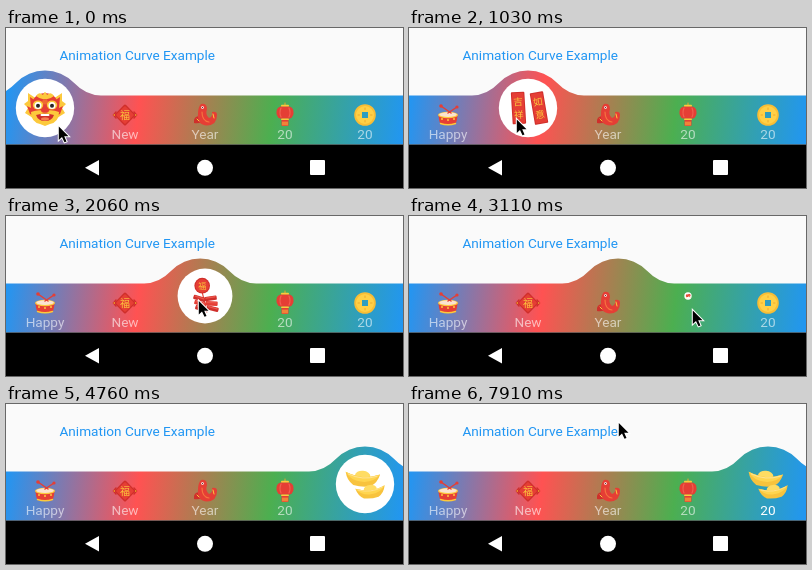
These frames come from a looping animation (397x160 px, 8000 ms). An HTML page with a canvas:

```html
<!DOCTYPE html>
<html lang="en">
<head>
<meta charset="utf-8">
<title>Animation Curve Example</title>
<style>
  html, body { margin: 0; height: 100%; overflow: hidden; background: #fafafa; }
  canvas { display: block; width: 397px; height: 160px; }
</style>
</head>
<body>
<canvas id="stage"></canvas>
<script>
const W = 397, H = 160, LOOP = 8000;
const BAR_TOP = 67.5, BAR_BOTTOM = 116.5;
const RED = '#e53e35', DARK_RED = '#cf2f2b', GOLD = '#fcc93c', AMBER = '#eda52c', CREAM = '#ffe7a8';
const canvas = document.getElementById('stage');
const ctx = canvas.getContext('2d');
const dpr = window.devicePixelRatio || 1;
canvas.width = W * dpr;
canvas.height = H * dpr;

// Drawing helpers
function shape(color, d, rule = 'nonzero') {
  ctx.fillStyle = color;
  ctx.fill(new Path2D(d), rule);
}
function line(color, width, d) {
  ctx.strokeStyle = color;
  ctx.lineWidth = width;
  ctx.lineCap = 'round';
  ctx.stroke(new Path2D(d));
}
function oval(color, x, y, rx, ry = rx, angle = 0) {
  ctx.fillStyle = color;
  ctx.beginPath();
  ctx.ellipse(x, y, rx, ry, angle, 0, Math.PI * 2);
  ctx.fill();
}
function box(color, x, y, w, h, radius = 1) {
  ctx.fillStyle = color;
  ctx.beginPath();
  ctx.roundRect(x - w / 2, y - h / 2, w, h, radius);
  ctx.fill();
}
function at(x, y, angle, scale, draw) {
  ctx.save();
  ctx.translate(x, y);
  ctx.rotate(angle);
  ctx.scale(scale, scale);
  draw();
  ctx.restore();
}
function text(string, x, y, color, align = 'center') {
  ctx.font = '13.6px Roboto, sans-serif';
  ctx.fillStyle = color;
  ctx.textAlign = align;
  ctx.textBaseline = 'alphabetic';
  ctx.fillText(string, x, y);
}
function glyph(char, x, y, size) {
  ctx.font = `${size}px "Noto Sans CJK SC", "Noto Sans CJK", sans-serif`;
  ctx.fillStyle = GOLD;
  ctx.textAlign = 'center';
  ctx.textBaseline = 'middle';
  ctx.fillText(char, x, y);
}

// Small icons, about 22px
function drum() {
  shape(RED, 'M-9.5 0 Q-9 9 -6 9.5 H6 Q9 9 9.5 0Z');
  line(GOLD, 1.5, 'M-7.5 8.5 Q0 11 7.5 8.5');
  oval(GOLD, 0, 0, 10, 3.2);
  oval('#fbe3d0', 0, -.4, 8.8, 2.4);
  for (const x of [-6, 0, 6]) oval(GOLD, x, 5 - Math.abs(x) / 6, 1);
  line(RED, 1.5, 'M-7 -9 L3 -2 M9 -8 L0 -2');
  oval(RED, -7, -9, 1.8);
  oval(RED, 9, -8, 1.6);
}
function diamond() {
  for (const side of [-1, 1]) {
    line(DARK_RED, 1.5, `M${side * 9} -3 L${side * 11.5} 0 L${side * 9} 3`);
    oval(AMBER, side * 10.5, 0, 1);
  }
  at(0, 0, Math.PI / 4, 1, () => {
    box(DARK_RED, 0, 0, 15.5, 15.5, 1.5);
    box(RED, 0, 0, 13, 13);
  });
  glyph('福', 0, 0, 10);
}
function fish() {
  shape(DARK_RED, 'M-5 1 Q-12 1 -11 8 Q-7 9 -3 7Z');
  shape(RED, 'M-4 -11 Q2 -12 2 -6 Q0 0 4 3 Q8 2 7 -3 Q12 -4 12 0 Q12 10 2 10.5 Q-8 10 -7 -1 Q-7 -8 -4 -11Z');
  line('#f5733f', 1.2, 'M-3 -3 Q-3 6 4 7');
  line(GOLD, 1, 'M8 -1 L9 3 M-8 4 L-6 6');
  oval('#fff', -2.5, -7.5, 1.3);
  oval('#40201c', -2.5, -7.5, .6);
}
function lantern() {
  line(AMBER, 1, 'M0 -12 V-9');
  box(RED, 0, 7.5, 7, 7, 1);
  line(GOLD, 1, 'M-2 7 V10 M0 7 V10 M2 7 V10');
  box(RED, 0, -2.5, 17, 12.5, 5.5);
  line('#f0604f', 1.2, 'M-4 -7 Q-6 -2.5 -4 2 M4 -7 Q6 -2.5 4 2');
  box(GOLD, 0, -9.3, 8, 1.8);
  box(GOLD, 0, 4.3, 8, 1.5);
}
function coin() {
  const disc = r => `M${-r} 0 A${r} ${r} 0 1 1 ${r} 0 A${r} ${r} 0 1 1 ${-r} 0Z`;
  shape('#f8bd35', disc(10.8) + 'M-3 -3 H3 V3 H-3Z', 'evenodd');
  shape('#ffd046', disc(9) + 'M-3 -3 H3 V3 H-3Z', 'evenodd');
  line(AMBER, .9, 'M0 -7 V-5.5 M0 7 V5.5 M-7 0 H-5.5 M7 0 H5.5');
}

// Large icons, about 40px
function lion() {
  for (const side of [-1, 1]) {
    ctx.save();
    ctx.scale(side, 1);
    shape(GOLD, 'M8 -9 L17 -15 L17 -7 L21 -4 L17 0 L20 5 L12 10Z');
    shape(RED, 'M9 -7 L15 -11 L14 0 L18 -2 L15 6 L8 9Z');
    ctx.restore();
  }
  shape(RED, 'M-14 2 Q-14 -14 0 -15 Q14 -14 14 2 L10 11 H-10Z');
  shape(GOLD, 'M-9 -12 Q-6 -17 -2 -13 Q0 -19 2 -13 Q6 -17 9 -12 Q4 -8 0 -9 Q-4 -8 -9 -12Z');
  oval('#ef6a32', 0, -6, 3, 2.5);
  for (const x of [-7, 7]) {
    oval(GOLD, x, -3, 5.2, 4.6);
    oval('#fff', x, -2.5, 3.5);
    oval('#2b2624', x, -2.3, 2);
  }
  shape(GOLD, 'M-14 4 Q-7 1 0 3 Q7 1 14 4 Q14 14 5 16 L0 18 L-5 16 Q-14 14 -14 4Z');
  shape(DARK_RED, 'M-9 7 Q0 4 9 7 Q7 13 0 13 Q-7 13 -9 7Z');
  box('#fff', 0, 7, 9, 2);
  oval('#f57d50', 0, 11, 4, 1.7);
  oval(RED, 0, 2.5, 4, 2.3);
}
function couplets() {
  const banner = (x, angle, chars) => at(x, 0, angle, 1, () => {
    box(DARK_RED, 0, 0, 13.5, 32);
    box(RED, 0, 0, 11.5, 30);
    glyph(chars[0], 0, -6.5, 9.5);
    glyph(chars[1], 0, 6.5, 9.5);
  });
  banner(-9.5, -.06, '吉祥');
  banner(11, -.17, '如意');
}
function firecrackers() {
  line(RED, 1.2, 'M-3 -4 L2 17');
  for (let row = 0; row < 3; row++) {
    for (const side of [-1, 1]) {
      at(side * 6 + row, 2.5 + row * 5.5, side < 0 ? .3 : -.15 + row * .2, 1, () => {
        box(row % 2 ? RED : DARK_RED, 0, 0, 13, 4.6);
        box('#ec554a', 0, -1, 11, 1.4);
      });
    }
  }
  oval(DARK_RED, -3, -11, 8.3);
  oval(RED, -3, -11, 7.2);
  glyph('福', -3, -11, 8.5);
}
function lanternPair() {
  const lamp = (x, y, angle, tassel) => {
    line(GOLD, 1.8, tassel);
    at(x, y, angle, 1, () => {
      line(AMBER, 1.2, 'M0 -13 V-9');
      box(DARK_RED, 0, -8.5, 10, 3);
      box(DARK_RED, 0, 8.5, 10, 3);
      box(RED, 0, 0, 19, 17, 4.5);
      line('#ee5c50', 1.2, 'M-5 -7 Q-7 0 -5 7 M5 -7 Q7 0 5 7');
      at(0, 0, Math.PI / 4, 1, () => box(GOLD, 0, 0, 4.5, 4.5));
    });
  };
  lamp(10, -6, -.2, 'M13 4 Q14 9 20 14 M11 4 Q13 11 17 15');
  lamp(-7, -2, .12, 'M-8 7 Q-8 13 -13 18 M-10 7 Q-10 12 -15 16');
}
function ingots() {
  const ingot = (x, y, angle, scale) => at(x, y, angle, scale, () => {
    oval('#ffdc63', 0, -2.5, 8, 5);
    shape('#f8c33d', 'M-18 -5 Q-8 -1 0 -1 Q8 -1 18 -5 Q16 4 9 8 Q0 10 -9 8 Q-16 4 -18 -5Z');
    shape('#ffd54f', 'M-18 -5 Q-8 -1 0 -1 Q8 -1 18 -5 Q12 4 0 4 Q-12 4 -18 -5Z');
    line(CREAM, .8, 'M-15 -3 Q0 3 15 -3');
  });
  ingot(-2.5, -6, .08, .96);
  ingot(5.5, 7, -.12, .82);
}

const tabs = [
  { label: 'Happy', icon: drum, activeIcon: lion },
  { label: 'New', icon: diamond, activeIcon: couplets },
  { label: 'Year', icon: fish, activeIcon: firecrackers },
  { label: '20', icon: lantern, activeIcon: lanternPair },
  { label: '20', icon: coin, activeIcon: ingots },
];
const tabX = index => 39 + 80 * index;

const TAPS = [820, 1907, 3070, 4270];
const TAP_DURATION = 180;
const PLAIN_STYLE_AT = 7310;

// Pointer stops: time, x, y
const POINTER = [
  [-40, 52, 97], [560, 107, 90], [1010, 107, 90], [1610, 192, 83.5],
  [2360, 192, 83.5], [2810, 283, 93], [3410, 283, 93], [4010, 354, 95.5],
  [4160, 354, 95.5], [4760, 400, 93], [7909, 400, 93], [7910, 209, 17.5], [LOOP, 209, 17.5],
];

function pointerAt(t) {
  const i = Math.max(1, POINTER.findIndex(stop => stop[0] >= t));
  const [t0, x0, y0] = POINTER[i - 1], [t1, x1, y1] = POINTER[i];
  const p = (t - t0) / (t1 - t0);
  return [x0 + (x1 - x0) * p, y0 + (y1 - y0) * p];
}

function drawBar(cx) {
  const gradient = ctx.createLinearGradient(0, BAR_TOP, W, BAR_BOTTOM);
  ['#2196f3', '#ff5252', '#4caf50', '#2196f3'].forEach((c, i) => gradient.addColorStop(i / 3, c));
  // Circular bump joined to the bar by two quadratic fillets
  const r = 40, cy = BAR_TOP + 15, a = r + 1, b = BAR_TOP - cy;
  const d2 = a * a + b * b;
  const px = (a * r * r - Math.abs(b) * r * Math.sqrt(d2 - r * r)) / d2;
  const py = cy - Math.sqrt(r * r - px * px);
  shape(gradient, `M-40 ${BAR_TOP} H${cx - a - 15} Q${cx - a} ${BAR_TOP} ${cx - px} ${py}
    A${r} ${r} 0 0 1 ${cx + px} ${py} Q${cx + a} ${BAR_TOP} ${cx + a + 15} ${BAR_TOP}
    H440 V${BAR_BOTTOM} H-40Z`);
}

function drawTabs(active, scale, plain) {
  tabs.forEach((tab, i) => {
    const x = tabX(i);
    if (i !== active) {
      at(x, 87, 0, 1, tab.icon);
      text(tab.label, x, 111.2, 'rgba(255,255,255,.6)');
      return;
    }
    at(x, 80, 0, scale, () => {
      if (!plain) oval('#fff', 0, 0, 29.2);
      tab.activeIcon();
    });
    if (plain) text(tab.label, x, 111.2, '#fff');
  });
}

function drawSystemBar() {
  ctx.fillStyle = '#000';
  ctx.fillRect(0, BAR_BOTTOM, W, H - BAR_BOTTOM);
  shape('#fff', 'M79 139.7 L93 132 V147.5Z');
  oval('#fff', 199, 139.8, 8);
  box('#fff', 311.5, 139.5, 15, 15);
}

function drawPointer(x, y) {
  at(x, y, 0, 1, () => {
    const arrow = 'M.8 1.5 V15 L4 12 L6.5 17.3 L8.5 16.4 L6.2 11.2 H10.5Z';
    line('#fff', 2, arrow + 'M.8 1.5 L10.5 11.2');
    shape('#000', arrow);
  });
}

function render(time) {
  const t = Math.floor((time - 110) / 150) * 150 + 110;
  const active = TAPS.filter(tap => t >= tap).length;
  const p = active ? Math.min(1, (t - TAPS[active - 1]) / TAP_DURATION) : 1;
  const eased = p * p * (3 - 2 * p);

  ctx.setTransform(dpr, 0, 0, dpr, 0, 0);
  ctx.fillStyle = '#fafafa';
  ctx.fillRect(0, 0, W, H);
  text('Animation Curve Example', 53.5, 32, '#2196f3', 'left');
  drawBar(tabX(active - 1 + eased));
  drawTabs(active, eased, t >= PLAIN_STYLE_AT);
  drawSystemBar();
  drawPointer(...pointerAt(t));
}

const start = performance.now();
function tick() {
  render((performance.now() - start) % LOOP);
  requestAnimationFrame(tick);
}
tick();
</script>
</body>
</html>
```
